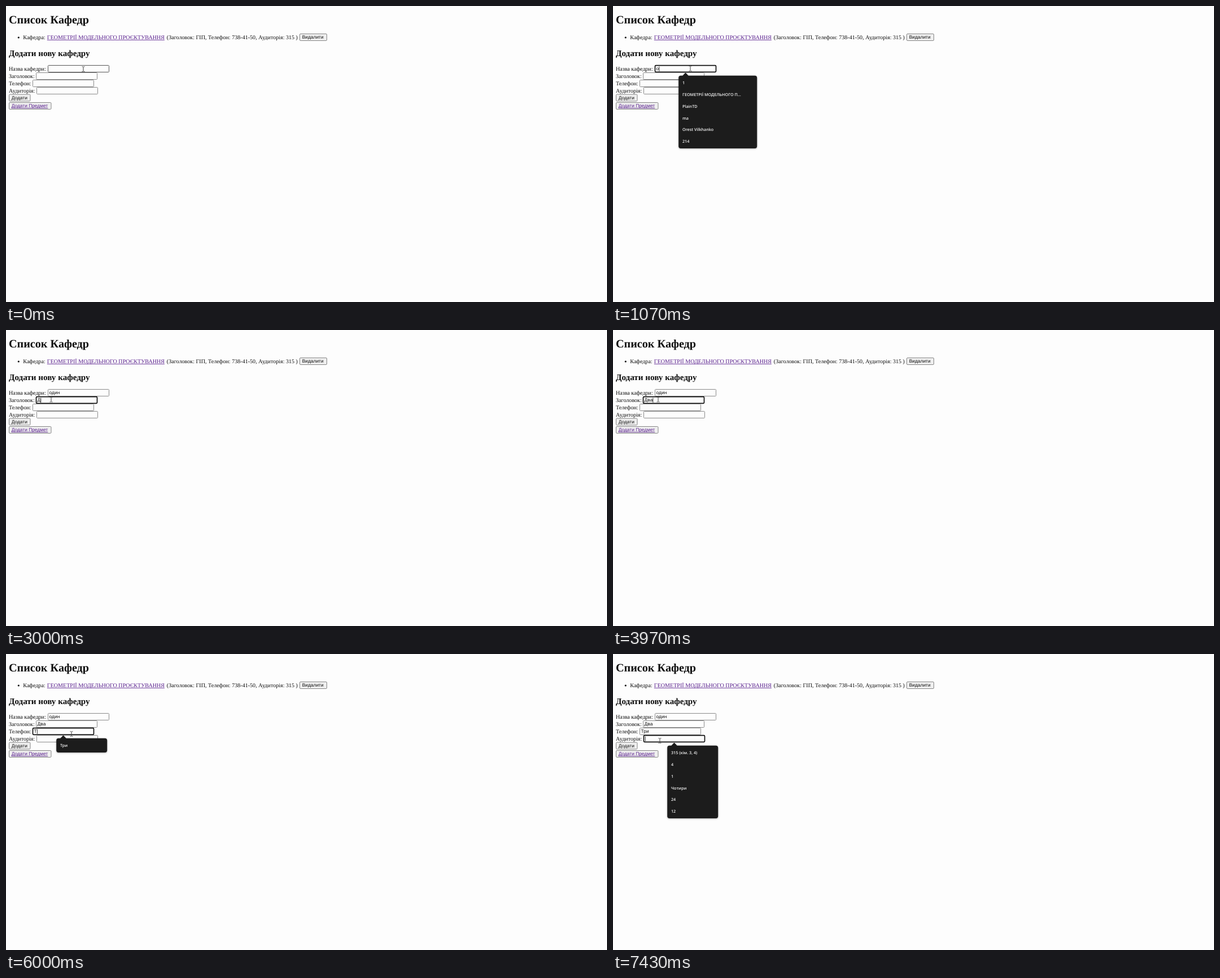
An HTML page with a canvas that plays this animation: 1065x526 px, repeating every 8 s.

```html
<!DOCTYPE html>
<html lang="uk">
<head>
<meta charset="utf-8">
<title>Список Кафедр</title>
<style>
html, body { margin: 0; width: 100%; height: 100%; overflow: hidden; background: #fdfdfd; }
canvas { display: block; width: 1065px; height: 526px; }
</style>
</head>
<body>
<canvas id="stage" width="1065" height="526"></canvas>
<script>
const ctx = document.getElementById('stage').getContext('2d');
const LOOP = 8000;
const PAGE = '#fdfdfd', INK = '#0c0c0c', LINK = '#551a8b', POPUP = '#1c1c1c';
const SERIF = '"Liberation Serif", serif';
const SANS = '"Liberation Sans", sans-serif';
const UI = '"Open Sans", "Noto Sans", sans-serif';

const fields = [
  { label: 'Назва кафедри:', x: 74, y: 105 },
  { label: 'Заголовок:', x: 53, y: 118 },
  { label: 'Телефон:', x: 47, y: 131 },
  { label: 'Аудиторія:', x: 54, y: 144 }
];
const FIELD_W = 109, FIELD_H = 13;

// Typed text: field index, moment, value
const typing = [
  [0, 1070, 'о'], [0, 1570, 'од'], [0, 1600, 'оди'], [0, 2000, 'один'],
  [1, 3000, 'Д'], [1, 3100, 'Дв'], [1, 3970, 'Два'],
  [2, 6000, 'Т'], [2, 6070, 'Тр'], [2, 6130, 'Три']
];
const focusTimes = [870, 2830, 4930, 7030];

// Suggestion lists: field, start, end, fade length, width, items
const popups = [
  { field: 0, from: 900, to: 1570, fade: 130, w: 139,
    items: ['1', 'ГЕОМЕТРІЇ МОДЕЛЬНОГО П...', 'PlainTD', 'ma', 'Orest Vilkhanko', '214'] },
  { field: 0, from: 1570, to: 2830, fade: 0, w: 90, items: ['Один', 'Один'] },
  { field: 2, from: 4970, to: 6000, fade: 200, w: 96,
    items: ['738-41-50', '3', '1', 'Три', '24', '12'] },
  { field: 2, from: 6000, to: 6130, fade: 0, w: 90, items: ['Три'] },
  { field: 3, from: 7100, to: LOOP, fade: 300, w: 90,
    items: ['315 (кім. 3, 4)', '4', '1', 'Чотири', '24', '12'] }
];

// Pointer path: moment, x, y
const path = [
  [0, 137, 112], [30, 137, 112], [230, 137, 111], [2829, 137, 111],
  [2830, 80, 123.5], [4870, 80, 123.5], [5000, 116, 142], [6669, 116, 142],
  [6670, 100, 149], [6830, 100, 149], [7030, 83, 154], [LOOP, 83, 154]
];

const clamp = v => Math.max(0, Math.min(1, v));

function pointerAt(t) {
  const i = path.findIndex(p => p[0] > t);
  const [t0, x0, y0] = path[i - 1], [t1, x1, y1] = path[i];
  const k = clamp((t - t0) / (t1 - t0)), e = k * k * (3 - 2 * k);
  return { x: x0 + (x1 - x0) * e, y: y0 + (y1 - y0) * e };
}

function valueAt(i, t) {
  const done = typing.filter(([f, at]) => f === i && at <= t);
  return done.length ? done[done.length - 1][2] : '';
}

function text(str, x, y, font, color = INK) {
  ctx.font = font;
  ctx.fillStyle = color;
  ctx.fillText(str, x, y);
  return ctx.measureText(str).width;
}

function link(str, x, y, font) {
  const w = text(str, x, y, font, LINK);
  ctx.fillRect(x, Math.round(y) + 1, w, 0.8);
}

function box(x, y, w, h, r, fill, stroke, line = 1) {
  ctx.beginPath();
  ctx.roundRect(x, y, w, h, r);
  ctx.fillStyle = fill;
  ctx.fill();
  if (!stroke) return;
  ctx.strokeStyle = stroke;
  ctx.lineWidth = line;
  ctx.stroke();
}

function button(str, x, y, w, isLink) {
  box(x + 0.5, y + 0.5, w - 1, 12, 1.5, '#efefef', '#858585');
  (isLink ? link : text)(str, x + 4.7, y + 9.3, '8.4px ' + SANS);
}

function drawPage() {
  const body = '10.09px ' + SERIF;
  ctx.fillStyle = PAGE;
  ctx.fillRect(0, 0, 1065, 526);
  text('Список Кафедр', 5, 30.7, 'bold 20.18px ' + SERIF);
  ctx.beginPath();
  ctx.arc(22.3, 56, 1.6, 0, 7);
  ctx.fill();
  text('Кафедра:', 30.3, 58.5, body);
  link('ГЕОМЕТРІЇ МОДЕЛЬНОГО ПРОЄКТУВАННЯ', 72.8, 58.5, body);
  text('(Заголовок: ГІП,', 284.8, 58.5, body);
  text('Телефон: 738-41-50, Аудиторія: 315 )', 358, 58.5, body);
  button('Видалити', 520, 49, 49);
  text('Додати нову кафедру', 5, 88.7, 'bold 15.13px ' + SERIF);
  fields.forEach(f => text(f.label, 5, f.y + 9.5, body));
  button('Додати', 5, 156.5, 38.5);
  button('Додати Предмет', 5, 171, 75.5, true);
}

function drawField(f, value, focused, hover) {
  if (focused) box(f.x + 0.5, f.y + 0.7, FIELD_W - 1, FIELD_H - 1.4, 1.5, PAGE, '#101010', 1.7);
  else box(f.x + 0.5, f.y + 0.5, FIELD_W - 1, FIELD_H - 1, 1, PAGE, hover ? '#555' : '#8a8a8a');
  const w = text(value, f.x + 2.6, f.y + 9.4, '8.4px ' + SANS);
  if (focused) ctx.fillRect(f.x + 2.8 + w, f.y + 2.5, 0.8, 8.5);
}

function drawPopup(p, t) {
  const f = fields[p.field], cx = f.x + FIELD_W / 2;
  const x = cx - 12.3, y = f.y + 18.7;
  ctx.save();
  ctx.globalAlpha = p.fade ? clamp((t - p.from) / p.fade) : 1;
  ctx.shadowColor = 'rgba(0,0,0,0.35)';
  ctx.shadowBlur = 3;
  ctx.shadowOffsetY = 0.7;
  box(x, y, p.w, p.items.length * 20.8 + 4.5, 4, POPUP);
  ctx.shadowColor = 'transparent';
  ctx.beginPath();
  ctx.moveTo(cx - 5.3, y + 0.3);
  ctx.lineTo(cx - 0.7, y - 4.6);
  ctx.lineTo(cx + 0.7, y - 4.6);
  ctx.lineTo(cx + 5.3, y + 0.3);
  ctx.fill();
  p.items.forEach((s, i) => text(s, x + 6.8, y + 15.4 + i * 20.8, '600 7.2px ' + UI, '#f4f4f4'));
  ctx.restore();
}

function drawPointer({ x, y }) {
  x = Math.round(x);
  ctx.fillStyle = '#3c3c3c';
  ctx.fillRect(x - 0.5, y - 4, 1, 8);
  for (const dy of [-4.7, 3.9]) {
    ctx.fillRect(x - 2.5, y + dy, 2, 0.9);
    ctx.fillRect(x + 0.5, y + dy, 2, 0.9);
  }
}

function draw(t) {
  const mouse = pointerAt(t);
  const active = focusTimes.filter(at => at <= t).length - 1;
  drawPage();
  fields.forEach((f, i) => {
    const hover = mouse.x > f.x && mouse.x < f.x + FIELD_W && mouse.y > f.y && mouse.y < f.y + FIELD_H;
    drawField(f, valueAt(i, t), i === active, hover);
  });
  popups.filter(p => t >= p.from && t < p.to).forEach(p => drawPopup(p, t));
  drawPointer(mouse);
}

ctx.textRendering = 'geometricPrecision';
const start = performance.now();
function tick() {
  draw((performance.now() - start) % LOOP);
  requestAnimationFrame(tick);
}
tick();
</script>
</body>
</html>
```
